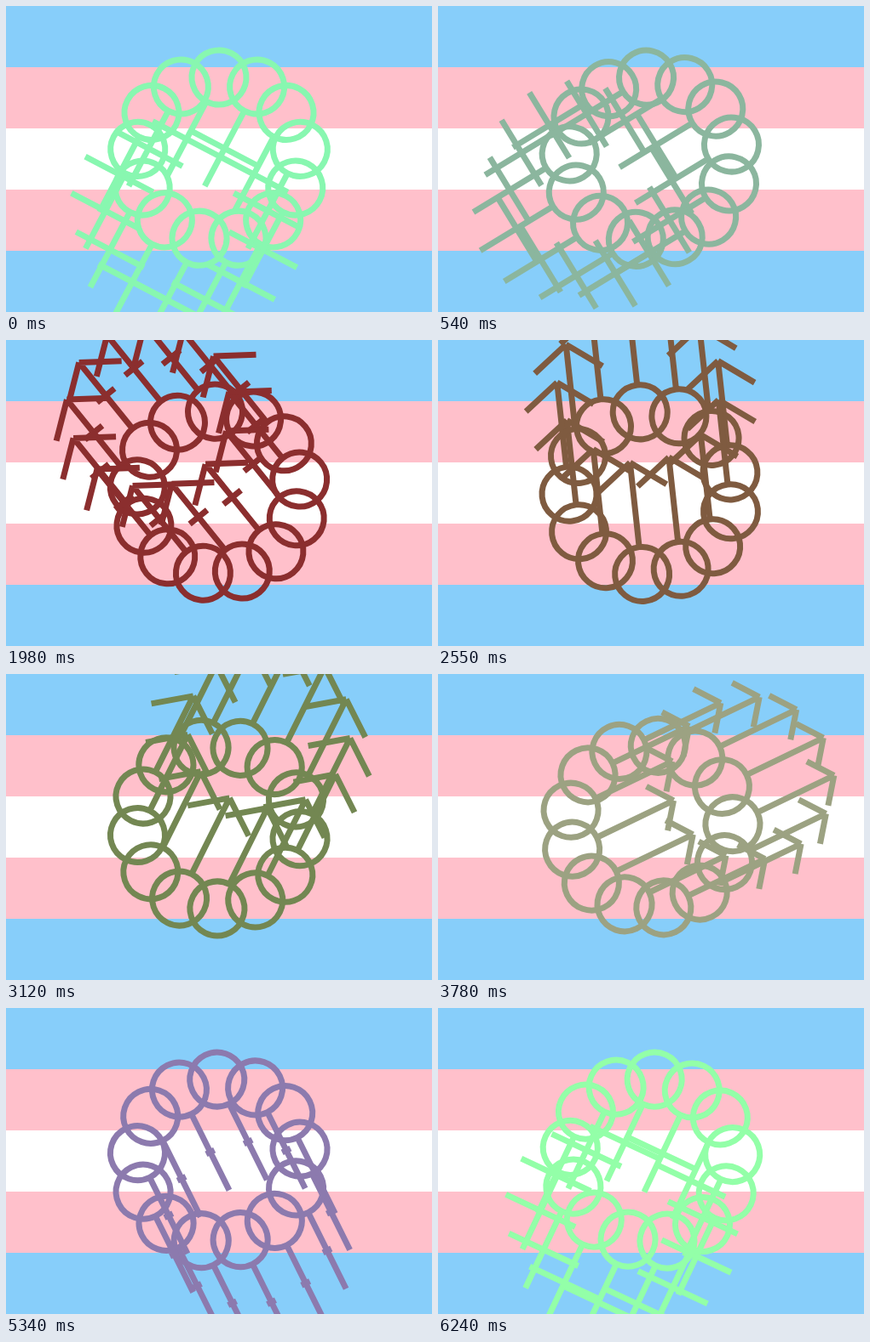
Recreate the animation shown at these times as an HTML page with a canvas. Size 500x360 px, loop 6.27 s.

```html
<!DOCTYPE html>
<html lang="en">
<head>
<meta charset="utf-8">
<title>Turning symbols</title>
<style>
  html, body { margin: 0; width: 100%; height: 100%; overflow: hidden; }
  canvas { display: block; width: 500px; height: 360px; }
</style>
</head>
<body>
<canvas id="stage" width="500" height="360"></canvas>
<script>
const ctx = document.getElementById('stage').getContext('2d');
const TAU = Math.PI * 2;
const LOOP = 6270, STEP = 30;
const COUNT = 13, RING = 96, RADIUS = 32, TIP = 132, BAR_AT = 82;
const STRIPES = ['#87cefa', '#ffc0cb', '#ffffff', '#ffc0cb', '#87cefa'];

// time in ms, then red, green, blue
const COLORS = [
  [0, 136, 247, 176],
  [1050, 142, 120, 141],
  [1980, 139, 46, 46],
  [3120, 115, 135, 82],
  [4440, 196, 189, 178],
  [5340, 140, 122, 174],
  [6240, 147, 255, 168],
  [LOOP, 136, 247, 176]
];

const clamp = v => Math.max(0, Math.min(1, v));

function colorAt(ms) {
  const i = COLORS.findIndex(c => c[0] > ms);
  const a = COLORS[i - 1], b = COLORS[i];
  const k = (ms - a[0]) / (b[0] - a[0]);
  const rgb = [1, 2, 3].map(n => Math.round(a[n] + (b[n] - a[n]) * k));
  return `rgb(${rgb})`;
}

function drawFlag() {
  STRIPES.forEach((color, i) => {
    ctx.fillStyle = color;
    ctx.fillRect(0, i * 72, 500, 72);
  });
}

// One symbol; its stem points along +y before turning.
function drawSymbol(x, y, turn, bar, arrow) {
  ctx.save();
  ctx.translate(x, y);
  ctx.rotate(turn);
  const line = (x1, y1, x2, y2) => {
    ctx.moveTo(x1, y1);
    ctx.lineTo(x2, y2);
  };
  ctx.beginPath();
  ctx.arc(0, 0, RADIUS, 0, TAU);
  line(0, RADIUS, 0, TIP);
  if (bar > 0) line(-45 * bar, BAR_AT, 45 * bar, BAR_AT);
  if (arrow > 0) {
    line(0, TIP, -40 * arrow, TIP - 30 * arrow);
    line(0, TIP, 40 * arrow, TIP - 30 * arrow);
  }
  ctx.stroke();
  ctx.restore();
}

function draw(ms) {
  const angle = ms / 1000;
  const turn = angle + TAU / COUNT;
  const bar = clamp(1.9 * Math.cos(turn - Math.PI / 3));
  const arrow = clamp(2.19 * (Math.cos(turn - Math.PI) - 0.105));

  drawFlag();
  ctx.strokeStyle = colorAt(ms);
  ctx.lineWidth = 7;
  for (let i = 0; i < COUNT; i++) {
    const a = i * TAU / COUNT - angle;
    drawSymbol(250 + RING * Math.sin(a), 180 - RING * Math.cos(a), turn, bar, arrow);
  }
}

const start = performance.now();
function tick() {
  const ms = (performance.now() - start) % LOOP;
  draw(Math.floor(ms / STEP) * STEP);
  requestAnimationFrame(tick);
}
tick();
</script>
</body>
</html>
```
